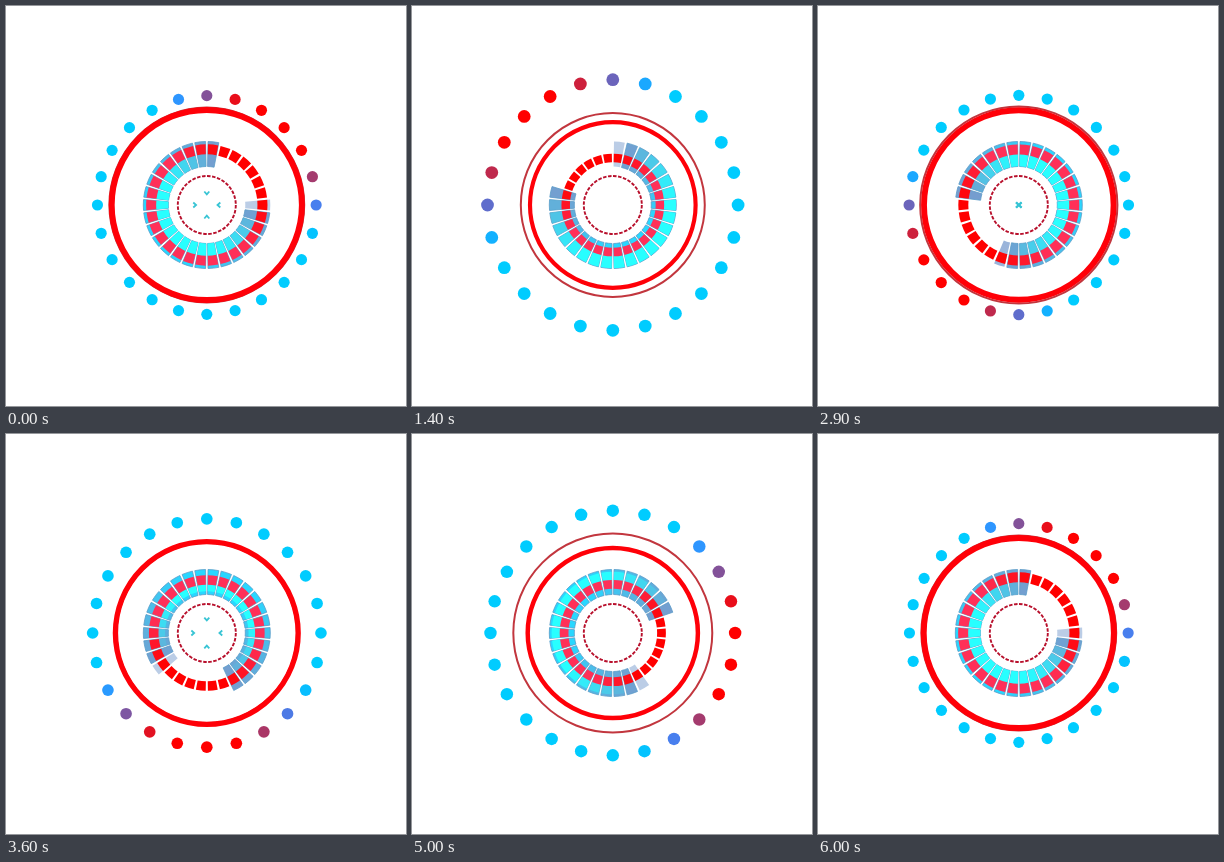
An HTML page with a canvas that plays this animation: 400x400 px, repeating every 6.1 s.

```html
<!DOCTYPE html>
<html lang="en">
<head>
<meta charset="utf-8">
<style>
  html, body { margin: 0; width: 100%; height: 100%; overflow: hidden; background: #fff; }
  canvas { display: block; }
</style>
</head>
<body>
<canvas id="stage" width="400" height="400"></canvas>
<script>
const ctx = document.getElementById('stage').getContext('2d');
const LOOP = 6100, STEP = 100, TAU = Math.PI * 2, RAD = Math.PI / 180;
const SEGMENTS = 30, DOTS = 24;

const clamp = x => Math.min(1, Math.max(0, x));
const ramp = (x, from, to) => clamp((x - from) / (to - from));
const mix = (a, b, k) => a + (b - a) * k;
const rgba = (r, g, b, a = 1) => `rgba(${r}, ${g}, ${b}, ${a})`;
const distance = (a, b) => Math.abs(((a - b) % 360 + 540) % 360 - 180);
const wave = (t, peak) => Math.cos((t - peak) * TAU / 3);

// Colours by angular distance from the turning highlight or gap
function dotColor(away) {
  const k = ramp(away, 22, 67);
  return rgba(255 * (1 - k) ** 1.3, 204 * k, 255 * clamp(k * 1.5));
}
function baseColor(away) {
  const k = ramp(away, 40, 140);
  return rgba(mix(120, 40, k), mix(155, 215, k), mix(205, 255, k), ramp(away, 34, 42));
}
const glowColor = away => rgba(40, 255, 255, ramp(away, 50, 120));
function redColor(away) {
  const k = ramp(away, 36, 90);
  return rgba(255, 48 * k, 88 * k);
}

function ring(radius, width, color) {
  ctx.beginPath();
  ctx.arc(0, 0, radius, 0, TAU);
  ctx.lineWidth = width;
  ctx.strokeStyle = color;
  ctx.stroke();
}

function segmentRing(radius, width, color, center, outline) {
  for (let i = 0; i < SEGMENTS; i++) {
    const angle = i * 360 / SEGMENTS, from = (angle - 4.9) * RAD, to = (angle + 4.9) * RAD;
    const away = distance(angle, center);
    ctx.beginPath();
    ctx.arc(0, 0, radius + width / 2, from, to);
    ctx.arc(0, 0, radius - width / 2, to, from, true);
    ctx.closePath();
    ctx.fillStyle = color(away);
    ctx.fill();
    if (outline && away > 40) {
      ctx.lineWidth = 0.8;
      ctx.strokeStyle = outline;
      ctx.stroke();
    }
  }
}

function dots(radius, center) {
  for (let i = 0; i < DOTS; i++) {
    const angle = i * 360 / DOTS;
    ctx.beginPath();
    ctx.arc(radius * Math.cos(angle * RAD), radius * Math.sin(angle * RAD), radius * 0.051, 0, TAU);
    ctx.fillStyle = dotColor(distance(angle, center));
    ctx.fill();
  }
}

function chevrons(ms) {
  const age = (ms + 108) % 908;
  if (age >= 288) return;
  const d = 19 - age * 0.06;
  ctx.lineWidth = 1.8;
  ctx.strokeStyle = '#38c4d4';
  for (let i = 0; i < 4; i++) {
    ctx.beginPath();
    ctx.moveTo(d + 1, -2.5);
    ctx.lineTo(d - 1.8, 0);
    ctx.lineTo(d + 1, 2.5);
    ctx.stroke();
    ctx.rotate(TAU / 4);
  }
}

function draw(ms) {
  const t = ms / 1000, turn = -60 * t, pulse = wave(t, 0.05);
  ctx.setTransform(1, 0, 0, 1, 0, 0);
  ctx.fillStyle = '#fff';
  ctx.fillRect(0, 0, 400, 400);
  ctx.translate(200.8, 199);

  dots(117.5 - 8.2 * pulse, turn - 50);
  ring(95.3 + 6.4 * wave(t, 2.41), 2, '#c2363e');
  ring(88.8 + 6.3 * pulse, 5 + 0.9 * pulse, '#ff0008');

  const gap = turn - 38, redRadius = 51.3 + 4.4 * pulse;
  segmentRing(51, 25, baseColor, gap, '#5c9cc8');
  segmentRing(51 - 5.5 * pulse, 14, glowColor, gap);
  segmentRing(redRadius, redRadius * 0.18, redColor, gap);

  const dash = TAU * 29 / 36;
  ctx.setLineDash([dash * 0.7, dash * 0.3]);
  ring(29, 1.9, '#b8102c');
  ctx.setLineDash([]);
  chevrons(ms);
}

function tick() {
  draw(Math.floor(performance.now() % LOOP / STEP) * STEP);
  requestAnimationFrame(tick);
}
tick();
</script>
</body>
</html>
```
